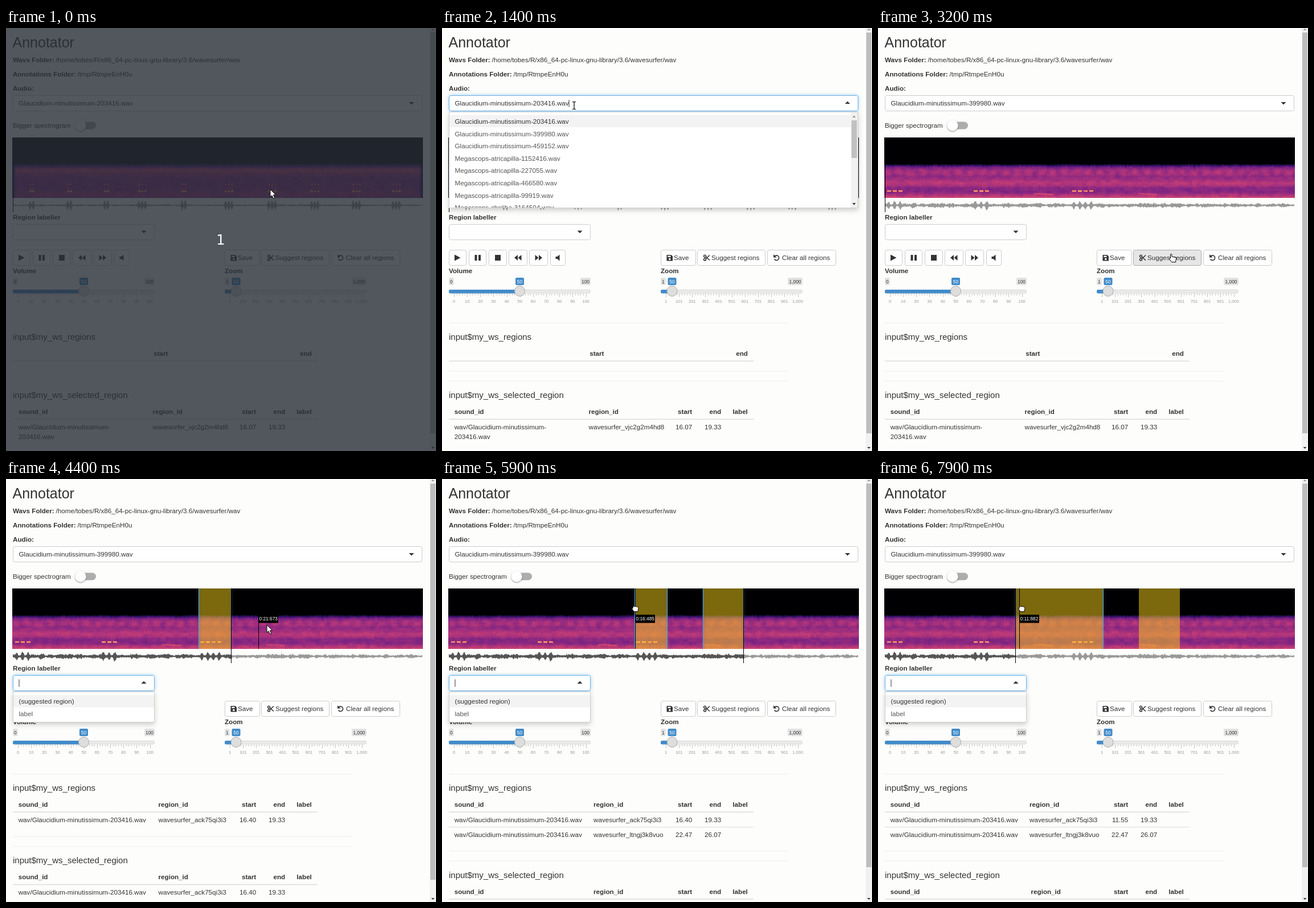
An HTML page with a canvas for the animation above (8 s loop, 755 by 742 pixels).

```html
<!DOCTYPE html>
<html lang="en">
<head>
<meta charset="utf-8">
<title>Annotator</title>
<style>
html, body { margin: 0; width: 100%; height: 100%; overflow: hidden; background: #fdfdfb; }
canvas { position: absolute; left: 11px; top: 192px; }
svg { position: absolute; left: 0; top: 0; }
text { font: 11.667px "Liberation Sans", Arial, sans-serif; fill: #333; white-space: pre; }
.b { font-weight: bold; }
.h2 { font-size: 25px; }
.h4 { font-size: 15px; }
.tag { font-size: 8.33px; }
.grid { font-size: 7.5px; fill: #999; text-anchor: middle; }
.r { text-anchor: end; }
.m { text-anchor: middle; }
.w { fill: #fff; }
.dim { fill: #555; }
.box { fill: #fff; stroke: #ccc; }
.focus { stroke: #66afe9; filter: drop-shadow(0 0 3px rgba(102,175,233,.6)); }
.menu { fill: #fff; stroke: #d0d0d0; filter: drop-shadow(0 4px 4px rgba(0,0,0,.18)); }
.hot { fill: #f3f3f3; }
.hr { fill: #eee; }
.rule { fill: #ddd; }
.ico { fill: #333; }
.line { fill: none; stroke: #333; stroke-width: 1.6; }
.region { fill: rgba(247,208,24,.5); }
.edge { fill: none; stroke: #58a6d4; filter: drop-shadow(0 0 2px #3a6fb0); }
.cur { fill: #fff; stroke: #000; stroke-linejoin: round; }
</style>
</head>
<body>
<canvas id="specA" width="721" height="106"></canvas>
<canvas id="specB" width="721" height="106"></canvas>
<svg id="stage" width="755" height="742"></svg>
<script>
const $ = id => document.getElementById(id);
const show = (id, on) => { $(id).style.display = on ? '' : 'none'; };
const rnd = (x, y) => { const s = Math.sin(x * 127.1 + y * 311.7) * 43758.5453; return s - Math.floor(s); };
const mix = (a, b, k) => a + (b - a) * k;
const smooth = k => k * k * (3 - 2 * k);

// Interpolates rows of [key, ...values]
function sample(rows, k, ease = v => v) {
  if (k <= rows[0][0]) return rows[0].slice(1);
  const i = rows.findIndex(r => r[0] > k);
  if (i < 0) return rows[rows.length - 1].slice(1);
  const a = rows[i - 1], b = rows[i], f = ease((k - a[0]) / (b[0] - a[0]));
  return a.slice(1).map((v, j) => mix(v, b[j + 1], f));
}

// ---- markup helpers; y of a text is the middle of its capitals
const T = (x, y, s, c = '', shift = 4) => `<text x="${x}" y="${y + shift}" class="${c}">${s}</text>`;
const R = (x, y, w, h, c, extra = '') => `<rect x="${x}" y="${y}" width="${w}" height="${h}" class="${c}" ${extra}/>`;
const P = (d, c = 'ico', extra = '') => `<path d="${d}" class="${c}" ${extra}/>`;
const G = (id, s) => `<g id="${id}">${s}</g>`;
const down = (x, y) => P(`M${x - 4.5} ${y - 2}h9l-4.5 4.5z`);
const up = (x, y) => P(`M${x - 4.5} ${y + 2}h9l-4.5 -4.5z`);
const field = (x, y, w, h, c = '', id = '') => R(x + .5, y + .5, w - 1, h - 1, 'box ' + c, `rx="3" id="${id}"`);

function slider(x, val, lo, hi, handle, labels) {
  const loW = lo.length * 4.7 + 4, hiW = hi.length > 3 ? 26 : 18, x0 = x + 9;
  let s = R(x, 438, loW, 13, '', 'rx="2" fill="#e2e2e2"') + T(x + loW / 2, 444.5, lo, 'tag m', 3)
    + R(x + 249 - hiW, 438, hiW, 13, '', 'rx="2" fill="#e2e2e2"') + T(x + 249 - hiW / 2, 444.5, hi, 'tag m', 3)
    + R(handle - 7.5, 438, 15, 13, '', 'rx="2" fill="#428bca"') + T(handle, 444.5, val, 'tag m w', 3)
    + R(x + .5, 459.5, 248, 5.5, '', 'rx="2.5" fill="#eaeaea" stroke="#d8d8d8"')
    + R(x, 459, handle - x, 6.5, '', 'rx="2.5" fill="#428bca"');
  for (let i = 0; i <= 50; i++)
    s += R(Math.round(x0 + i * 4.63), 466, 1, i % 5 ? 3 : 6, '', 'fill="#c4c4c4"');
  labels.forEach((l, i) => { s += T(x0 + i * 23.15, 479, l, 'grid', 2.7); });
  return s + `<circle cx="${handle}" cy="461.5" r="9" fill="#dedede" stroke="#ababab"/>`;
}

function tableRow(y, col, [sound, region, start, end, label], c = '') {
  return T(21.7, y, sound, c) + T(col, y, region, c) + T(439.2, y, start, c + ' r')
    + T(490.2, y, end, c + ' r') + T(510.3, y, label, c);
}
const HEAD = ['sound_id', 'region_id', 'start', 'end', 'label'];
const WAV = 'wav/Glaucidium-minutissimum-203416.wav';
const FILES = ['Glaucidium-minutissimum-203416', 'Glaucidium-minutissimum-399980', 'Glaucidium-minutissimum-459152',
  'Megascops-atricapilla-1152416', 'Megascops-atricapilla-227055', 'Megascops-atricapilla-466580',
  'Megascops-atricapilla-99919', 'Megascops-choliba-3164504'].map(f => f + '.wav');

// ---- sounds: call groups are [centre, pulses]
const A = { id: 'A', scale: 452 / 36.496, gap: 5.5, width: 1.7, base: 1, burst: 8.5,
  calls: [[45, 2], [111, 2], [176, 2], [239, 3], [312, 2], [391, 3], [467, 3], [542, 3], [615, 3], [685, 3]],
  rows: [[44, 0], [46, .13], [50, .33], [53, .55], [57, .63], [62, .54], [69, .47], [80, .46], [90, .47], [96, .52], [102, .52], [105, .3]] };
const B = { id: 'B', scale: 431 / 21.673, gap: 10, width: 2, base: 3, burst: 5.5,
  calls: [[29, 3], [181, 3], [359, 4]],
  rows: [[45, 0], [47, .17], [51, .42], [57, .55], [63, .55], [67, .49], [72, .53], [78, .61], [83, .57], [87, .47], [94, .46], [98, .53], [102, .64], [105, .64]] };
const pulses = snd => snd.calls.flatMap(([c, n]) => Array.from({ length: n }, (_, i) => c + (i - (n - 1) / 2) * snd.gap));
const PALETTE = [[0, 0, 0, 3], [.15, 28, 16, 68], [.3, 79, 18, 123], [.45, 129, 37, 129], [.6, 181, 54, 122],
  [.75, 229, 80, 100], [.88, 251, 145, 90], [1, 252, 235, 140]];

function blob(x, y) {
  const i = Math.floor(x), j = Math.floor(y), f = smooth(x - i), g = smooth(y - j);
  return mix(mix(rnd(i, j), rnd(i + 1, j), f), mix(rnd(i, j + 1), rnd(i + 1, j + 1), f), g) - .5;
}

function paintSpectrogram(snd) {
  const canvas = $('spec' + snd.id), { width: w, height: h } = canvas;
  const ctx = canvas.getContext('2d'), img = ctx.createImageData(w, h);
  const ps = pulses(snd), isA = snd === A;
  for (let x = 0; x < w; x++) {
    const near = ps.reduce((m, p) => Math.min(m, Math.abs(p - 11 - x)), 99);
    for (let row = 0; row < h; row++) {
      const y = row - 1;
      let v = sample(snd.rows, y + (rnd(x, 7) - .5) * 1.4)[0];
      if (v > 0) {
        v += (rnd(x, y) - .5) * .07 + (rnd(x, Math.floor(y / 4) + 500) - .5) * .03 + blob(x / 8, y / 5) * .08;
        if (isA) {
          v *= Math.min(1, (Math.min(x, w - 1 - x) + 1) / 7);
          if (near < 2) v += [[93, .5], [89, .15], [81, .24]].reduce((s, [c, k]) => s + k * Math.exp(-((y - c) ** 2) / 1.8), 0);
        } else {
          v += .04 * Math.sin(x / 3.3) * Math.exp(-((y - 60) ** 2) / 30);
          if (near < 3.5) v += .5 * Math.exp(-((y - 92.5) ** 2) / 1.8);
          for (const [sx, k] of [[262, .2], [445, .16], [588, .07]])
            if (x > sx && x < sx + 34) v += k * Math.exp(-((y - 97 - (x - sx) / 22) ** 2) / 1.2);
        }
      }
      const c = sample(PALETTE, Math.max(0, Math.min(1, v)));
      img.data.set([c[0], c[1], c[2], 255], (row * w + x) * 4);
    }
  }
  ctx.putImageData(img, 0, 0);
}

function wavePath(snd) {
  const ps = pulses(snd), top = [], low = [];
  for (let x = 12; x <= 731; x++) {
    const burst = ps.reduce((m, p) => Math.max(m, Math.exp(-(((x - p) / snd.width) ** 2))), 0);
    const hum = snd.base * (.8 + blob(x / 5, 3));
    const amp = k => (.4 + hum * (.3 + rnd(x, k)) + burst * snd.burst * (.7 + .4 * rnd(x, k + 1))).toFixed(1);
    top.push(`${x} ${311 - amp(31)}`);
    low.unshift(`${x} ${311 + +amp(47)}`);
  }
  return 'M' + top.concat(low).join('L') + 'z';
}
const waves = snd => G('wave' + snd.id, P(wavePath(snd), '', 'fill="#999"') + P(wavePath(snd), '', 'fill="#555" clip-path="url(#played)"'));

// ---- page
const button = (x, w, id = '') => field(x, 389, w, 28, '', id);
const tens = Array.from({ length: 11 }, (_, i) => i * 10);
const zooms = tens.map(v => v < 100 ? v * 10 + 1 : '1,000');
const regionShape = id => G(id, P('', 'region') + P('', 'edge'));

$('stage').innerHTML =
  `<clipPath id="played"><rect id="playedBox" x="12" y="298" width="0" height="26"/></clipPath>
   <clipPath id="menuClip"><rect x="12" y="148" width="718" height="167"/></clipPath>`
  + T(11.5, 25.5, 'Annotator', 'h2', 8.7)
  + T(12, 56, 'Wavs Folder:', 'b') + T(87.5, 56, '/home/tobes/R/x86_64-pc-linux-gnu-library/3.6/wavesurfer/wav')
  + T(12, 81, 'Annotations Folder:', 'b') + T(125.5, 81, '/tmp/RtmpeEnH0u')
  + T(12, 105.5, 'Audio:', 'b')
  + field(12, 118, 719, 28, '', 'audio') + `<text id="file" x="22.5" y="136"></text>`
  + G('audioDown', down(712, 132)) + G('audioUp', up(712, 131))
  + T(12, 171, 'Bigger spectrogram') + R(122, 164.5, 36, 13, '', 'rx="6.5" fill="#adadad"')
  + '<circle cx="131" cy="171" r="9.7" fill="#fff" style="filter:drop-shadow(0 1px 1px rgba(0,0,0,.45))"/>'
  + waves(A) + waves(B)
  + regionShape('reg1') + regionShape('reg2')
  + R(12, 192, 1, 131, '', 'id="head" fill="#000"')
  + G('hover', R(0, 192, 1, 106, '', 'fill="#000"') + R(0, 238, 35, 14.5, '', 'fill="#000"') + '<text id="clock" x="1.5" y="248" class="tag w"></text>')
  + T(12, 331.5, 'Region labeller', 'b')
  + field(12, 344, 249, 28, '', 'label') + G('labelDown', down(242, 357.5)) + G('labelUp', up(242, 357))
  + button(12, 31) + P('M22 397.5v11l10.5 -5.5z')
  + button(47, 31) + P('M57.5 398h4v10h-4zM64 398h4v10h-4z')
  + button(82, 32) + P('M93 398h10v10h-10z')
  + button(117, 33) + P('M133 398v10l-6 -5zM139.5 398v10l-6 -5z')
  + button(153, 33) + P('M163.5 398v10l6 -5zM170 398v10l6 -5z')
  + button(190, 27) + P('M199.5 401h3l4 -3.5v11l-4 -3.5h-3z')
  + button(384, 62) + P('M394.5 398h8l2.5 2.5v8h-10.5zM396.5 399.5v2.5h5v-2.5zM399.8 403.5a1.8 1.8 0 1 0 .1 0z', 'ico', 'fill-rule="evenodd"') + T(407, 403, 'Save')
  + button(448, 120, 'suggest') + P('M461.5 398.2a2 2 0 1 0 .1 0zM461.5 404a2 2 0 1 0 .1 0zM463 401l7 6.5M463 405l7 -6.5', 'line') + T(473, 403, 'Suggest regions')
  + button(571, 121) + P('M584 400.5a4.3 4.3 0 1 1 -.4 4.8', 'line') + P('M582 397v5.5h5.5z') + T(597, 403, 'Clear all regions')
  + T(12, 425.5, 'Volume', 'b') + slider(12, '50', '0', '100', 136.5, tens)
  + T(384, 425.5, 'Zoom', 'b') + slider(384, '50', '1', '1,000', 404, zooms)
  + R(12, 517, 595, 1, 'hr') + T(12, 541.5, 'input$my_ws_regions', 'h4', 5) + R(12, 583.5, 535, 1.5, 'rule')
  + G('regions', '')
  + G('below', R(12, 601.5, 595, 1, 'hr') + R(12, 619, 595, 1, 'hr')
    + T(12, 644, 'input$my_ws_selected_region', 'h4', 5) + R(12, 685.5, 535, 1.5, 'rule') + G('selected', ''))
  + G('labelMenu', R(12.5, 373.5, 248, 53, 'menu') + R(13, 379, 247, 21.5, 'hot')
    + T(22.5, 390, '(suggested region)') + T(22.5, 411.5, 'label', 'dim'))
  + R(22.5, 351.5, 1, 13, '', 'id="caret" fill="#333"')
  + G('audioMenu', R(222.5, 126, 1, 12.5, '', 'fill="#333"') + R(12.5, 147.5, 718, 168, 'menu')
    + '<g clip-path="url(#menuClip)">' + R(13, 152.5, 705, 21.6, 'hot', 'id="hot"')
    + FILES.map((f, i) => T(22.5, 164 + i * 21.6, f, i ? 'dim' : '')).join('') + '</g>'
    + R(718, 148, 12, 167, '', 'fill="#f1f1f1"') + R(719, 162, 9.5, 66, '', 'fill="#c1c1c1"')
    + P('M720.5 157h6l-3 -3.5z', '', 'fill="#999"') + P('M720.5 307h6l-3 3.5z'))
  + R(744, 0, 11, 742, '', 'fill="#f1f1f1"') + R(745, 8, 9, 703, '', 'id="thumb" fill="#bdbdbd"')
  + P('M746.5 4h6l-3 -3z', '', 'fill="#999"') + P('M746.5 735h6l-3 3z')
  + G('veil', R(0, 0, 755, 742, '', 'fill="rgba(40,45,54,.8)"')
    + '<text x="377" y="380" class="m w" style="font:24px \'DejaVu Sans\',sans-serif">1</text>')
  + G('cursor',
    G('arrow', P('M0 0V13.5L3 10.7L5.3 16L7.8 15L5.5 9.8H9.7z', 'cur'))
    + G('ibeam', P('M-3 -6.5h2l1 1l1 -1h2M0 -5.5v11M-3 6.5h2l1 -1l1 1h2', '', 'fill="none" stroke="#fff" stroke-width="3"')
      + P('M-3 -6.5h2l1 1l1 -1h2M0 -5.5v11M-3 6.5h2l1 -1l1 1h2', '', 'fill="none" stroke="#000" stroke-width="1.2"'))
    + G('hand', P('M-2.5 1V-6q1.2 -1.5 2.4 0v4l6 1.2q2 .5 1.7 2.5l-.8 3v3h-7l-4.6 -6q.4 -2 2.3 -.7z', 'cur'))
    + G('grab', P('M-4 -3.5q1.5 -2 3 -.5q1.5 -1.2 2.7 0q1.6 -.8 2.6 .6q1.8 0 1.7 2l-.8 3v3h-7l-3.5 -4.5q-.3 -1.8 1.5 -1.4z', 'cur')));

paintSpectrogram(A);
paintSpectrogram(B);

// ---- motion: pointer as [ms, x, y]
const PATH = [[300, 464, 283], [400, 492, 272], [900, 231, 141], [1300, 231, 141], [1400, 232, 136], [1500, 232, 136],
  [1900, 223, 180], [2400, 223, 180], [3200, 516, 403], [3300, 516, 403], [3700, 355, 240], [3800, 355, 240],
  [3900, 338, 236], [4200, 396, 245], [4300, 443, 258], [4400, 458, 256], [4800, 458, 250], [5200, 530, 245],
  [5300, 530, 245], [5700, 386, 230], [5800, 339.83, 228], [5900, 339, 228], [6100, 339, 228], [6300, 388, 276],
  [6700, 388, 276], [6900, 338, 228], [7400, 241.7, 228], [7700, 241.7, 228], [7800, 248.3, 228], [7900, 252, 228]];
const pointer = t => sample(PATH, t, smooth);
const within = (t, a, b) => t >= a && t < b;

function region(id, x1, x2, on, visible) {
  show(id, visible);
  const [fill, edge] = $(id).children, l = Math.floor(x1), r = Math.floor(x2);
  fill.setAttribute('d', `M${l} 298V192H${r}V298z`);
  edge.setAttribute('d', `M${l + .5} 192V298M${r - .5} 192V298`);
  edge.style.display = on ? '' : 'none';
}

let tables = '';
function fillTables(n, moved) {
  if (tables === n + '' + moved) return;
  tables = n + '' + moved;
  const first = [WAV, 'wavesurfer_ack75qi3i3', moved ? '11.55' : '16.40', '19.33', ''];
  const second = [WAV, 'wavesurfer_ltngj3k8vuo', '22.47', '26.07', ''];
  const col = [257.5, 267.5, 266][n];
  $('regions').innerHTML = n === 0
    ? T(284.5, 571, 'start', 'b r') + T(537, 571, 'end', 'b r')
    : tableRow(571, col, HEAD, 'b') + tableRow(597.5, col, first)
      + (n > 1 ? R(12, 610, 535, 1, 'rule') + tableRow(623.5, col, second) : '');
  const col2 = moved ? 268.5 : col;
  $('selected').innerHTML = tableRow(673, col2, HEAD, 'b') + (n === 0
    ? tableRow(700, col2, ['wav/Glaucidium-minutissimum-', 'wavesurfer_vjc2g2m4hd8', '16.07', '19.33', '']) + T(21.7, 716.5, '203416.wav')
    : tableRow(699.5, col2, n === 1 || moved ? first : second));
  $('below').setAttribute('transform', `translate(0 ${[0, 25.2, 50.7][n]})`);
  $('thumb').setAttribute('height', [703, 695, 673][n]);
}

function draw(now) {
  const t = Math.floor(now % 8000 / 100) * 100;
  const [x, y] = pointer(t);
  const snd = t < 2400 ? A : B;
  for (const s of [A, B]) { show('spec' + s.id, s === snd); show('wave' + s.id, s === snd); }

  const open = within(t, 1400, 2100);
  $('file').textContent = FILES[t < 2100 ? 0 : 1];
  show('audioMenu', open); show('audioUp', open); show('audioDown', !open);
  $('audio').classList.toggle('focus', open);
  $('hot').setAttribute('y', 152.5 + 21.6 * (y > 174 ? 1 : 0));

  const asking = within(t, 4300, 4800) || within(t, 5300, 6900) || t >= 7700;
  show('labelMenu', asking); show('labelUp', asking); show('labelDown', !asking);
  $('label').classList.toggle('focus', asking);
  show('caret', asking && !within(t, 5700, 5900) && !within(t, 6500, 6900));

  const overSuggest = within(x, 448, 568) && within(y, 389, 417);
  $('suggest').style.fill = overSuggest ? '#e6e6e6' : '';
  $('suggest').style.stroke = overSuggest ? '#adadad' : '';

  // Each edge follows the pointer only while it is dragged
  const left = t < 6900 ? 338 : pointer(Math.min(t, 7400))[0];
  region('reg1', left, t < 4200 ? Math.max(339, x) : 396.4, true, t >= 3900);
  region('reg2', 458.5, t < 5200 ? Math.max(459, x) : 530.2, t < 6900, t >= 4800);
  fillTables(t < 4200 ? 0 : t < 5200 ? 1 : 2, t >= 7500);

  const head = t < 4200 ? 12 : t < 5200 ? 395 : t < 7700 ? 529 : 241;
  $('head').setAttribute('x', head);
  $('playedBox').setAttribute('width', head - 12);

  // The time marker trails the pointer by one step
  const [hx, hy] = pointer(within(t, 6200, 6500) ? 6100 : t - 100);
  show('hover', t >= 100 && within(hy, 193, 298) && !open);
  $('hover').setAttribute('transform', `translate(${Math.floor(hx)} 0)`);
  const ms = Math.round((hx - 12) / snd.scale * 1000);
  $('clock').textContent = `0:${String(Math.floor(ms / 1000)).padStart(2, '0')}:${String(ms % 1000).padStart(3, '0')}`;

  const shape = within(t, 5900, 6200) || t >= 6900 ? 'grab' : overSuggest ? 'hand'
    : within(y, 118, 146) ? 'ibeam' : 'arrow';
  for (const s of ['arrow', 'ibeam', 'hand', 'grab']) show(s, s === shape);
  $('cursor').setAttribute('transform', `translate(${Math.round(x)} ${Math.round(y)})`);
  show('veil', t < 100);
}

const start = performance.now();
function tick() {
  draw(performance.now() - start);
  requestAnimationFrame(tick);
}
tick();
</script>
</body>
</html>
```
